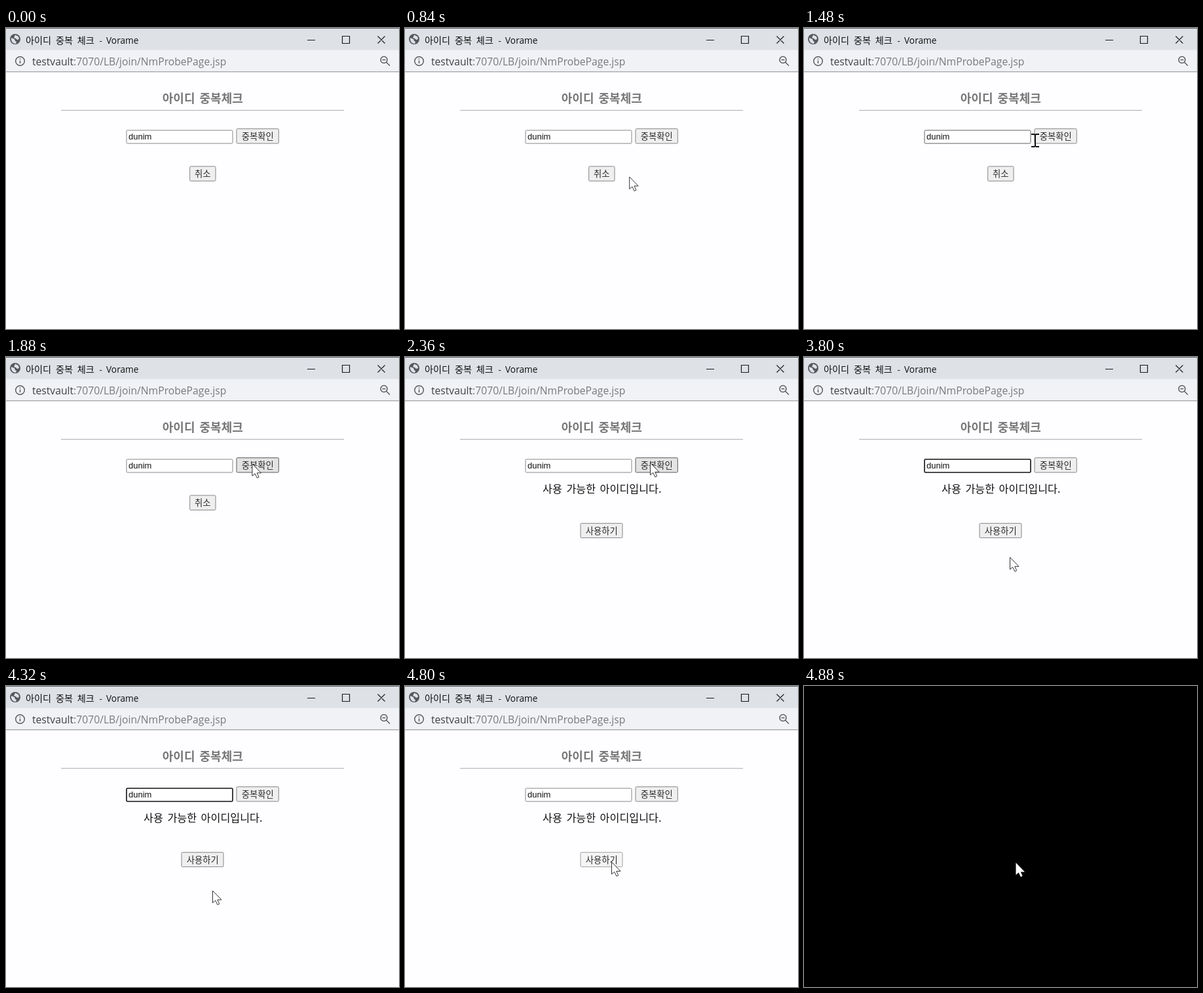
An HTML page for the animation above (4920 ms loop, 600x459 px).

```html
<!DOCTYPE html>
<html lang="ko">
<head>
<meta charset="utf-8">
<title>아이디 중복 체크</title>
<style>
  html, body { margin: 0; width: 100%; height: 100%; overflow: hidden; background: #fefdff; }
  svg { display: block; width: 600px; height: 459px; }
  text { font-family: "Noto Sans CJK KR", "Noto Sans CJK", sans-serif; fill: #111; }
  .latin { font-family: "Open Sans", sans-serif; }
  .mid { text-anchor: middle; }
  .line { fill: none; stroke: #1c1c1c; stroke-width: 1.2; }
  .icon { fill: none; stroke: #5a5d61; stroke-width: 1.5; }
  .button rect { fill: #efefef; stroke: #858585; }
  .button text { font-size: 13.33px; text-anchor: middle; fill: #2c2c2c; }
  .button.hover rect { fill: #e3e3e3; stroke: #5a5a5a; }
  .button.active rect { fill: #f5f5f5; stroke: #a0a0a0; }
  #field { fill: #fff; stroke: #858585; }
  #field.hover { stroke: #5f5f5f; }
  #field.focus { stroke: #101010; stroke-width: 1.6; }
</style>
</head>
<body>
<svg viewBox="0 0 600 459">
  <rect width="600" height="459" fill="#fefdff"/>

  <!-- window frame -->
  <rect width="600" height="34" fill="#dee1e6"/>
  <rect width="600" height="1" fill="#5d6269"/>
  <rect y="33.5" width="600" height="32.5" fill="#f0f2f5"/>
  <rect y="66" width="600" height="1" fill="#a8abae"/>
  <rect y="67" width="600" height="1" fill="#dcdde0"/>
  <circle cx="14" cy="17" r="8" fill="#55595e"/>
  <path d="M8 15l5 2 1 3 2 1-1 3c-4 0-8-4-7-9zM14 10.5l5 2.5 1 4-3 1-2-2-3-1z" fill="#dee1e6"/>
  <text x="30" y="23.5" font-size="14.2" word-spacing="2.8">아이디 중복 체크</text>
  <text class="latin" x="142.5" y="23.5" font-size="13.5">-</text>
  <text class="latin" x="153" y="23.5" font-size="13.7">Vorame</text>
  <path class="line" d="M460 18.5h12M513.5 12.5h11v11h-11zM567.5 12.5l11 11M578.5 12.5l-11 11"/>

  <!-- address bar -->
  <circle class="icon" cx="21.5" cy="50.5" r="6.8"/>
  <path class="icon" d="M21.5 49.5v4.5M21.5 46.5v1.6"/>
  <text class="latin" x="40" y="56.5" font-size="15.7" style="fill:#3f4246">testvault<tspan fill="#777a7e">:7070/LB/join/NmProbePage.jsp</tspan></text>
  <circle class="icon" cx="577" cy="48.5" r="5"/>
  <path class="icon" d="M574.5 48.5h5M580.7 52.2l5.3 5.3"/>

  <!-- page -->
  <text class="mid" x="300.3" y="113.5" font-size="18" font-weight="700" word-spacing="2" style="fill:#777">아이디 중복체크</text>
  <path d="M84 125.5h432" stroke="#b0b0b0"/>
  <rect id="field" x="184" y="156" width="162" height="20" rx="1.5"/>
  <text x="187" y="170" font-size="13" style="font-family:'Liberation Sans',sans-serif">dunim</text>
  <g id="check" class="button">
    <rect x="352" y="153.7" width="64.3" height="22.3" rx="1.5"/>
    <text x="384.3" y="170">중복확인</text>
  </g>
  <g id="cancel" class="button">
    <rect x="280.7" y="211" width="39.3" height="22.3" rx="1.5"/>
    <text x="300.3" y="227">취소</text>
  </g>
  <g id="result">
    <text class="mid" x="300.8" y="207" font-size="16.2" word-spacing="2">사용 가능한 아이디입니다.</text>
    <g id="use" class="button">
      <rect x="268" y="253.7" width="64" height="22" rx="1.5"/>
      <text x="300.2" y="270">사용하기</text>
    </g>
  </g>

  <rect id="closed" width="600" height="459"/>
  <g id="cursor">
    <path id="arrow" d="M0.5 0.5V19L4.7 15.4L7.9 22L10.7 20.7L7.8 14.4H14Z" fill="#fff" stroke="#333"/>
    <path id="beam" d="M-6 -9H-1.5L0 -8L1.5 -9H6M0 -8V9M-6 10H-1.5L0 9L1.5 10H6" fill="none" stroke="#111" stroke-width="2"/>
  </g>
</svg>
<script>
const LOOP = 4920, STEP = 40;
const ENTER = 640, RESULT = 1960, FOCUS = 3200, PRESS = 4600, CLOSE = 4880;

// time, x, y of the pointer
const path = [
  [640, 340, 230], [1100, 345, 222], [1480, 353, 171], [1680, 376, 163],
  [2360, 374, 161], [2520, 372, 165], [2920, 305, 184], [3160, 300, 170],
  [3300, 300, 170], [3800, 314, 305], [3940, 315, 364], [4080, 315, 364],
  [4520, 315, 268], [4800, 315, 268], [4880, 323, 269]
];

const el = id => document.getElementById(id);
const show = (id, on) => el(id).style.display = on ? "" : "none";
const mark = (id, name, on) => el(id).classList.toggle(name, on);

function pointerAt(t) {
  const i = path.findIndex(p => p[0] >= t);
  if (i < 1) return path[0].slice(1);
  const [t0, x0, y0] = path[i - 1], [t1, x1, y1] = path[i];
  const k = (t - t0) / (t1 - t0);
  return [x0 + (x1 - x0) * k, y0 + (y1 - y0) * k];
}

function draw(t) {
  const [x, y] = pointerAt(t);
  const inside = (l, top, r, b) => t >= ENTER && x >= l && x <= r && y >= top && y <= b;
  const closed = t >= CLOSE, done = t >= RESULT;
  const onCheck = inside(356, 153, 417, 177);
  const beam = !onCheck && inside(183, 150, 390, 212);

  show("closed", closed);
  show("cancel", !done);
  show("result", done);
  mark("check", "hover", onCheck);
  mark("cancel", "hover", inside(280, 210, 321, 234));
  mark("use", "hover", inside(267, 253, 333, 276));
  mark("use", "active", t >= PRESS);
  mark("field", "hover", inside(176, 155, 354, 177));
  mark("field", "focus", t >= FOCUS && t < PRESS);

  show("cursor", t >= ENTER);
  show("beam", beam);
  show("arrow", !beam);
  el("arrow").setAttribute("stroke", closed ? "none" : "#333");
  el("cursor").setAttribute("transform", `translate(${x} ${y})`);
}

const start = performance.now();
function frame() {
  const t = (performance.now() - start) % LOOP;
  draw(Math.floor(t / STEP) * STEP);
  requestAnimationFrame(frame);
}
frame();
</script>
</body>
</html>
```
